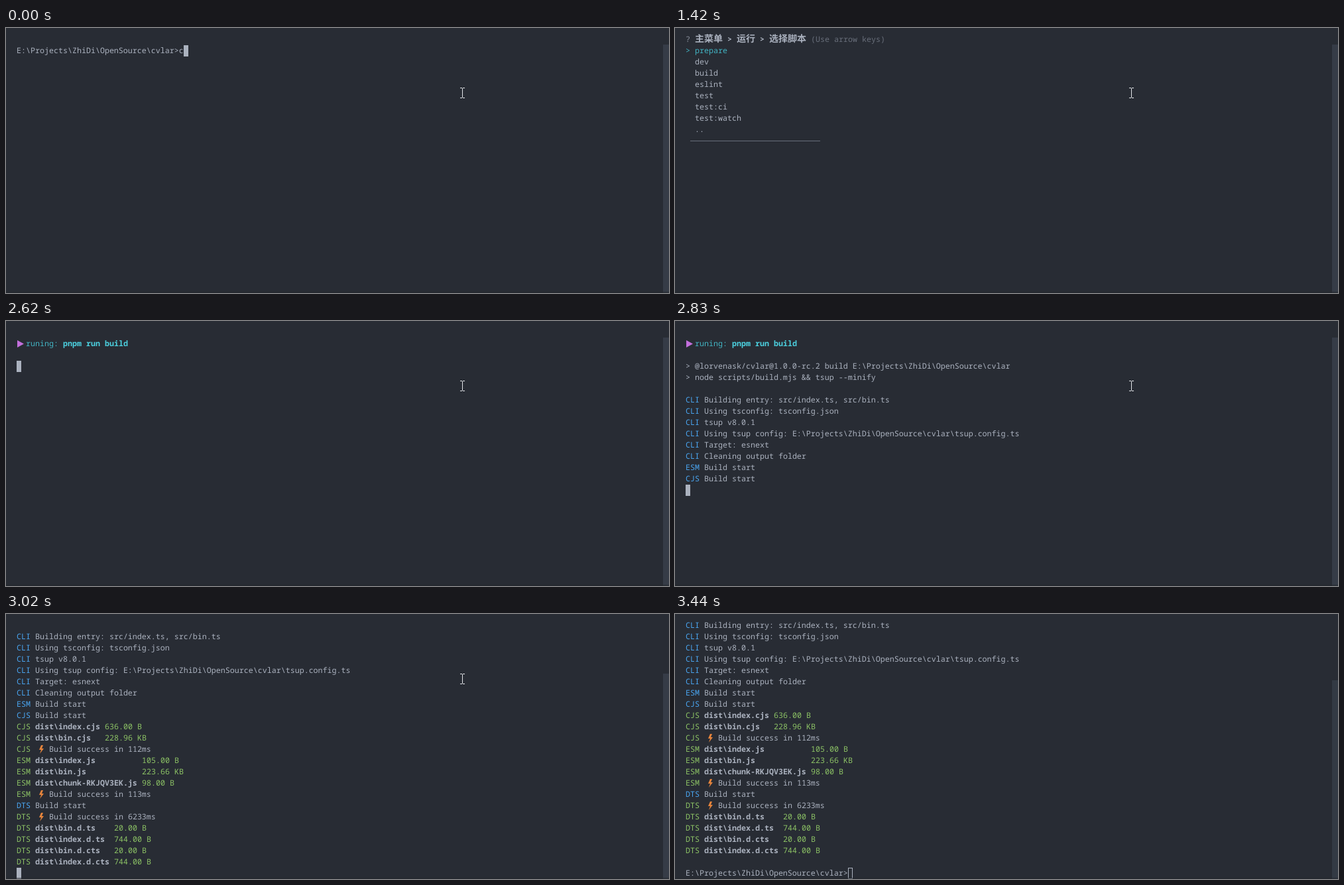
Write an HTML page that moves like this. It is 1000 px wide and 400 px high and loops after 3510 ms.

```html
<!DOCTYPE html>
<html lang="zh-CN">
<head>
<meta charset="utf-8">
<title>Terminal build</title>
<style>
html, body { margin: 0; width: 100%; height: 100%; overflow: hidden; background: #282c34; }
#stage { position: relative; width: 1000px; height: 400px; overflow: hidden; background: #282c34; }
.scene { position: absolute; left: 16px; top: 9px; visibility: hidden; }
.scene span {
  position: absolute; white-space: pre; color: #abb2bf;
  font: 11.667px/17px "Noto Sans Mono", "DejaVu Sans Mono", monospace;
  font-kerning: none; font-variant-ligatures: none; text-rendering: geometricPrecision;
}
.scene .cjk { font: 14px/17px "Noto Sans CJK SC", "Noto Sans CJK", sans-serif; margin-top: -1px; }
.scene .bold, .scene .run { font-weight: 700; }
.scene .dim { color: #686e7a; }
.scene .mark { color: #8a909c; }
.scene .cyan { color: #42b3c2; }
.scene .run { color: #4cd1e0; }
.scene .blue { color: #4aa5f0; }
.scene .green { color: #8cc265; }
.scene .bolt, .scene .play { width: 14px; height: 17px; }
.scene .bolt { background: #e5843c; clip-path: polygon(9px 2px, 6px 9px, 9px 9px, 7px 15px, 13px 7px, 10px 7px, 12px 2px); }
.scene .play { background: #c36fdc; clip-path: polygon(1px 3px, 11px 8.5px, 1px 14px); }
.rule { position: absolute; height: 1px; background: #686e7a; }
.caret { position: absolute; width: 7px; height: 17px; box-sizing: border-box; background: #abb2bf; }
.caret.hollow { background: none; border: 1px solid #abb2bf; }
#thumb { position: absolute; left: 991px; width: 9px; bottom: 0; background: #363c47; }
#edge { position: absolute; left: 0; right: 0; bottom: 0; height: 2px; background: #21252b80; }
#mouse { position: absolute; left: 685px; top: 90px; }
</style>
</head>
<body>
<div id="stage">
  <div id="thumb"></div>
  <div id="edge"></div>
  <svg id="mouse" width="8" height="16" fill="none" stroke="#e4e6ea">
    <path d="M0 .5h3m1 0h3M3.5 1v14M0 15.5h3m1 0h3"/>
  </svg>
</div>
<script>
const LOOP = 3510, CELL = 7, ROW = 17, ROWS = 23;
const stage = document.getElementById('stage');
const thumb = document.getElementById('thumb');
const mouse = document.getElementById('mouse');
const raw = String.raw;
const PROMPT = raw`E:\Projects\ZhiDi\OpenSource\cvlar>`;

// A line is a list of parts; a part is plain text or [class, text].
const cli = text => [['blue', 'CLI'], ' ' + text];
const start = kind => [['blue', kind], ' Build start'];
const done = (kind, ms) => [['green', kind], ' ', ['bolt', '  '], ` Build success in ${ms}ms`];
const file = (kind, name, pad, size) =>
  [['green', kind], ' ', ['bold', ('dist\\' + name).padEnd(pad)], ' ', ['green', size]];

const LOG = [
  [],
  [['play', '  '], ['cyan', 'runing: '], ['run', 'pnpm run build']],
  [],
  [raw`> @lorvenask/cvlar@1.0.0-rc.2 build E:\Projects\ZhiDi\OpenSource\cvlar`],
  ['> node scripts/build.mjs && tsup --minify'],
  [],
  cli('Building entry: src/index.ts, src/bin.ts'),
  cli('Using tsconfig: tsconfig.json'),
  cli('tsup v8.0.1'),
  cli(raw`Using tsup config: E:\Projects\ZhiDi\OpenSource\cvlar\tsup.config.ts`),
  cli('Target: esnext'),
  cli('Cleaning output folder'),
  start('ESM'),
  start('CJS'),
  file('CJS', 'index.cjs', 14, '636.00 B'),
  file('CJS', 'bin.cjs', 14, '228.96 KB'),
  done('CJS', 112),
  file('ESM', 'index.js', 22, '105.00 B'),
  file('ESM', 'bin.js', 22, '223.66 KB'),
  file('ESM', 'chunk-RKJQV3EK.js', 22, '98.00 B'),
  done('ESM', 113),
  start('DTS'),
  done('DTS', 6233),
  file('DTS', 'bin.d.ts', 16, '20.00 B'),
  file('DTS', 'index.d.ts', 16, '744.00 B'),
  file('DTS', 'bin.d.cts', 16, '20.00 B'),
  file('DTS', 'index.d.cts', 16, '744.00 B'),
  [],
  [PROMPT]
];

function place(parent, tag, cls, col, row, text = '') {
  const el = document.createElement(tag);
  el.className = cls;
  el.style.left = col * CELL + 'px';
  el.style.top = row * ROW + 'px';
  el.textContent = text;
  parent.append(el);
  return el;
}

function drawLine(parent, parts, row) {
  let col = 0;
  for (const part of parts) {
    const [cls, text] = Array.isArray(part) ? part : ['', part];
    for (const run of text.match(/[\u4e00-\u9fff]+|[^\u4e00-\u9fff]+/g) || []) {
      const wide = /[\u4e00-\u9fff]/.test(run);
      place(parent, 'span', wide ? cls + ' cjk' : cls, col, row, run);
      col += run.length * (wide ? 2 : 1);
    }
  }
}

// caret is [column, row, extra class]
function scene(lines, caret, scroll = 0) {
  const el = document.createElement('div');
  el.className = 'scene';
  lines.forEach((parts, row) => drawLine(el, parts, row));
  if (caret) place(el, 'div', 'caret ' + (caret[2] || ''), caret[0], caret[1]);
  stage.insertBefore(el, thumb);
  return { el, scroll };
}

const typed = text => scene([[], [PROMPT + text]], [PROMPT.length + text.length, 1]);

function menu(title, hint, items, picked, note) {
  const lines = [[['mark', '?'], ' ', ['bold', title], ['dim', hint]]];
  items.forEach((item, i) => lines.push(i === picked ? [['cyan', '> ' + item]] : ['  ' + item]));
  if (note) lines.push(['! ', ['dim', note]]);
  return scene(lines);
}

function scripts(picked) {
  const items = ['prepare', 'dev', 'build', 'eslint', 'test', 'test:ci', 'test:watch', '..'];
  const s = menu('主菜单 > 运行 > 选择脚本', picked ? '' : ' (Use arrow keys)', items, picked);
  const rule = place(s.el, 'div', 'rule', 1, 9);
  rule.style.width = 28 * CELL + 'px';
  rule.style.marginTop = '8px';
  return s;
}

// The first n log lines, scrolled so that the caret line stays in view
function log(n, caretCol = 0, caretClass = '') {
  const caretLine = caretCol ? n - 1 : n;
  const scroll = Math.max(0, caretLine - ROWS + 1);
  return scene(LOG.slice(scroll, n), [caretCol, caretLine - scroll, caretClass], scroll);
}

const lastLog = caretClass => log(LOG.length, PROMPT.length, caretClass);

const mainItems = ['运行', 'Git', '包管理', '日志管理', '帮助', '退出'];
const steps = [
  [0, typed('c')],
  [60, typed('cv')],
  [120, typed('cvl')],
  [180, typed('cvla')],
  [240, typed('cvlar')],
  [300, scene([[], [PROMPT + 'cvlar']], [0, 2])],
  [360, scene([], [0, 0])],
  [420, menu('我想 ...', ' (Use arrow keys)', mainItems, 0, '选择要运行的脚本')],
  [1420, scripts(0)],
  [1820, scripts(1)],
  [2220, scripts(2)],
  [2620, log(3)],
  [2690, log(6)],
  [2760, log(10)],
  [2830, log(14)],
  [2900, log(17)],
  [2960, log(22)],
  [3020, log(27)],
  [3090, log(28)],
  [3160, lastLog('')],
  [3440, lastLog('hollow')]
];

// [time, dx, dy, scrollbar opacity]
const pointer = [
  [0, 0, 0, 1], [3230, 2, -28, 1], [3300, 5, -58, 0.95], [3370, 8, -89, 0.9], [3440, 8, -140, 0.85]
];

const at = (table, t) => table.filter(step => step[0] <= t).pop();
let shown;

function draw() {
  const t = performance.now() % LOOP;
  const next = at(steps, t)[1];
  if (next !== shown) {
    if (shown) shown.el.style.visibility = 'hidden';
    next.el.style.visibility = 'visible';
    const hidden = next.scroll + 1;
    thumb.style.top = Math.round(9 + 391 * hidden / (hidden + ROWS)) + 'px';
    shown = next;
  }
  const [, dx, dy, alpha] = at(pointer, t);
  mouse.style.transform = `translate(${dx}px, ${dy}px)`;
  thumb.style.opacity = alpha;
  requestAnimationFrame(draw);
}
draw();
</script>
</body>
</html>
```
